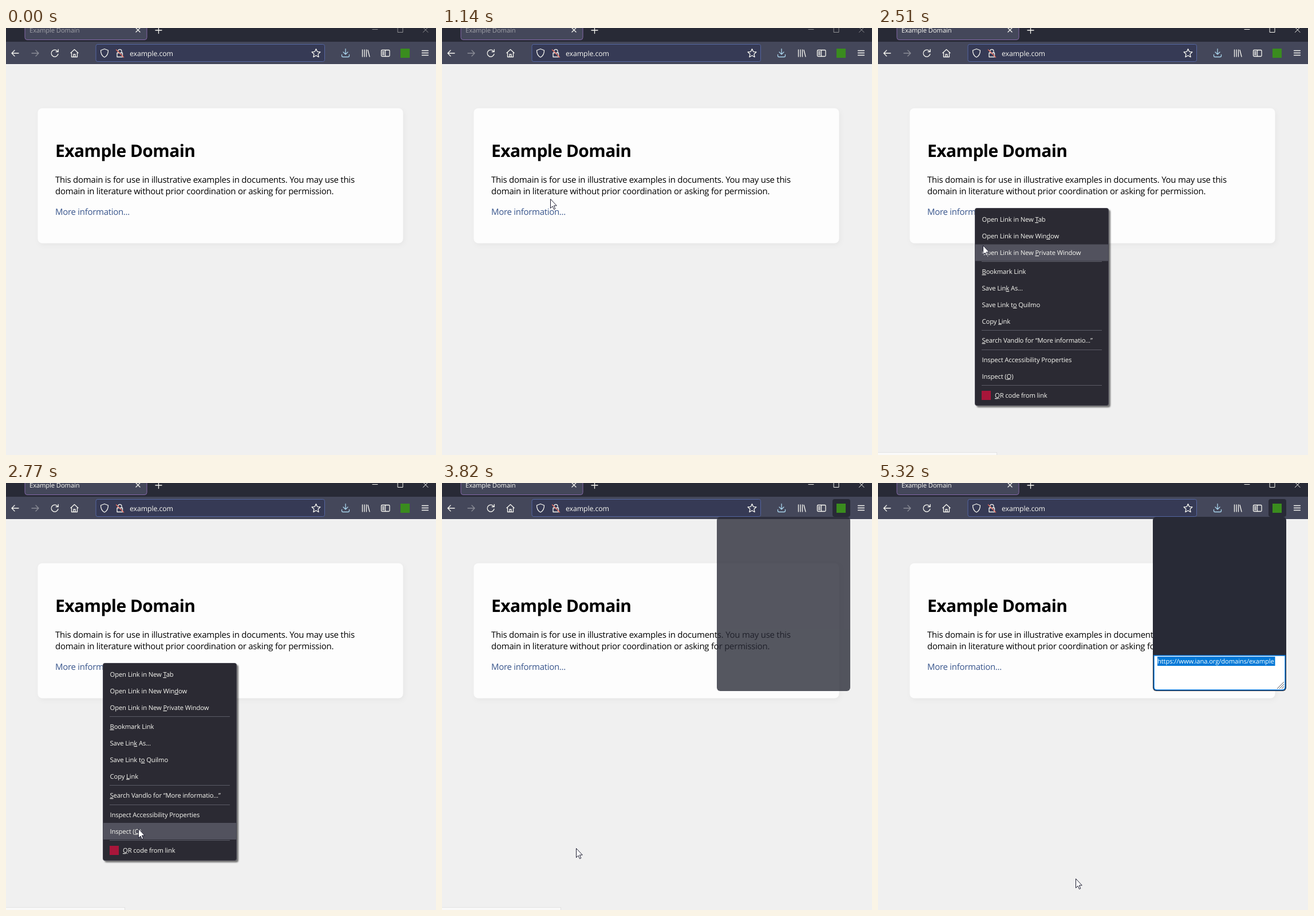
These frames come from a looping animation (751x745 px, 5.34 s). An HTML page:

```html
<!DOCTYPE html>
<html lang="en">
<head>
<meta charset="utf-8">
<title>Link menu demo</title>
<style>
  html, body { margin: 0; width: 100%; height: 100%; overflow: hidden; background: #f0f0f0; }
  svg { display: block; width: 100%; height: 100%; }
  text { font: 11.25px "Open Sans", "Noto Sans", sans-serif; letter-spacing: -.13px;
         fill: #f8f8f2; white-space: pre; text-rendering: geometricPrecision; }
  .page text { font-size: 15px; letter-spacing: -.25px; fill: #000; }
  .page .heading { font-size: 30px; font-weight: 700; letter-spacing: -.58px; }
  .page .link { fill: #38558c; letter-spacing: -.3px; }
  .address { font-size: 12.3px; letter-spacing: -.1px; }
  .key { text-decoration: underline; }
  .icons { fill: none; stroke: #f8f8f2; stroke-width: 1.3; stroke-linecap: round; stroke-linejoin: round; }
  .card { filter: drop-shadow(2px 3px 4px rgba(0, 0, 0, .04)); }
  .selected { fill: #fff; }
  #menu { filter: drop-shadow(3px 3px 1px rgba(0, 0, 0, .5)); }
  #pointer path { fill: #fff; stroke: #1c1c30; stroke-linejoin: round; }
</style>
</head>
<body>
<svg viewBox="0 0 751 745" preserveAspectRatio="none">
  <rect width="751" height="745" fill="#f0f0f0"/>

  <g class="page">
    <rect class="card" x="55.5" y="140" width="638" height="235.5" rx="8" fill="#fdfdfd"/>
    <text class="heading" x="86" y="225">Example Domain</text>
    <text x="86" y="270">This domain is for use in illustrative examples in documents. You may use this</text>
    <text x="86" y="290">domain in literature without prior coordination or asking for permission.</text>
    <text class="link" x="86" y="325.5">More information...</text>
  </g>
  <rect id="status" x="-1" y="740.5" width="208.5" height="8" fill="#f9f9f9" stroke="#e2e2e2"/>

  <rect width="751" height="24" fill="#282a36"/>
  <rect y="24" width="751" height="39" fill="#44475a"/>
  <rect y="63" width="751" height="1" fill="#fdfdfd"/>
  <rect x="33" y="-8" width="213" height="28.5" rx="4" fill="#44475a" stroke="#8468a8"/>
  <rect x="157" y="28.5" width="399.5" height="30" rx="3" fill="#363a55" stroke="#5567a2"/>
  <text class="address" x="216" y="48.5">example.com</text>
  <rect id="pressed" x="682" y="28" width="31" height="31" rx="4" fill="#282a36"/>
  <rect x="689" y="36" width="16" height="16" fill="#3a8c1e"/>

  <g id="chrome">
    <text x="41" y="8">Example Domain</text>
    <path class="icons" style="stroke-width:1" d="M640 2.5h9M684.5-1.5h8.5v9h-8.5zM728.5-1l8.500 8.500m0-8.500l-8.500 8.500"/>
  </g>
  <g class="icons">
    <path d="M227 0l7 7m0-7l-7 7M261 4h11M266.500-2v11.500"/>
    <path d="M22 44H10m5-5l-5 5 5 5"/>
    <path d="M45 44h12m-5-5l5 5-5 5" opacity=".4"/>
    <path d="M90.300 41a6 6 0 1 0 .700 4.500M91.300 37.500v4h-4"/>
    <path d="M113 43.500l6.500-6 6.500 6M114.500 43v7.500h10V43M118 50v-4h3v4"/>
    <path d="M172 36.500l6.500 2.500c0 5-1.500 9.500-6.500 12-5-2.500-6.500-7-6.500-12z"/>
    <path d="M194 43.500h9.500v7H194zM195.700 43v-2.500a3 3 0 0 1 6.300 0V43"/>
    <path d="M192.500 38l13 13" stroke="#f07060"/>
    <path d="M541.500 36.500l2.200 4.800 5.200.6-3.900 3.500 1.100 5.200-4.600-2.600-4.600 2.600 1.100-5.200-3.900-3.500 5.200-.6z"/>
    <path d="M593 36.500V46m-4-4l4 4 4-4M586.500 46.500v2q0 2 2 2h9q2 0 2-2v-2" stroke="#a9d4ec"/>
    <path d="M622.500 38v12M626 38v12M629.500 38v12M632 38.500l3 11.500"/>
    <path d="M657 38.500h11.500q1.500 0 1.500 1.500v8q0 1.500-1.500 1.500H657q-1.500 0-1.500-1.500v-8q0-1.500 1.500-1.500zM662.500 38.500v11M657.500 41.500h3m-3 2.500h3m-3 2.500h3"/>
    <path d="M726.500 39.500h11m-11 4h11m-11 4h11"/>
  </g>

  <g id="menu">
    <rect x="169.500" y="314.500" width="233" height="344" rx="3" fill="#2b2a33" stroke="#454450"/>
    <rect id="hover" x="170" width="232" height="29" fill="#52525e"/>
    <path d="M181 407.500h210M181 527.500h210M181 561.500h210M181 623.500h210" stroke="#5b5b66"/>
    <rect x="181" y="633" width="16" height="16" fill="#a8163a"/>
  </g>

  <g id="popup">
    <rect x="480" y="59" width="233" height="304" rx="6" fill="#282a36"/>
    <g id="field">
      <path d="M482 301h229v55q0 5-5 5H487q-5 0-5-5z" fill="#fff" stroke="#0a7be0" stroke-width="1.500"/>
      <rect x="488" y="303" width="205.500" height="16" fill="#0078d7"/>
      <text class="selected" x="488" y="315">https://www.iana.org/domains/example</text>
      <path d="M697 359l12-12m-8 12l8-8m-4 8l4-4" stroke="#55555c"/>
    </g>
  </g>

  <g id="pointer">
    <path id="arrow" d="M.5 .5V16.500L4 13l2.500 5.500 2.300-1L6.400 12H11.300z"/>
    <path id="hand" transform="translate(-6 -.5)" d="M4.500 2.200a1.500 1.500 0 0 1 3 0V7q0-1 1.300-1t1.400 1.200q.2-.9 1.400-.8t1.300 1.300q.3-.7 1.200-.5t1.100 1.300v5q0 2-1.300 3.600v3.400H5.500v-2.300Q4 16 1.400 12.700C.3 11.200 .3 10.300 1 9.800s2.200 0 3.500 1.600z"/>
  </g>
</svg>
<script>
const LOOP = 5340;
const ROW = 29;
const rows = [
  [334, 'Open Link in New _T_ab'],
  [363, 'Open Link in New Win_d_ow'],
  [392, 'Open Link in New _P_rivate Window'],
  [425, '_B_ookmark Link'],
  [454, 'Save Lin_k_ As...'],
  [483, 'Save Link t_o_ Quilmo'],
  [511.5, 'Copy _L_ink'],
  [545, '_S_earch Vandlo for “More informatio...”'],
  [579, 'Inspect Accessibility Properties'],
  [607.5, 'Inspect (_Q_)'],
  [641, '_Q_R code from link', 204]
];

// [time, x, y, slowdown]: a positive slowdown decelerates into the point
const path = [
  [80, 712, 750, 0],
  [620, 348, 394, .45],
  [1160, 185, 296, .35],
  [1560, 168, 313, .3],
  [2400, 168, 313, 0],
  [2530, 188, 400, -.8],
  [2770, 231, 603, .6],
  [2940, 234, 637, .5],
  [3020, 234, 630, 0],
  [3100, 234, 637, 0],
  [5200, 234, 637, 0],
  [5320, 345, 690, .2]
];

const $ = id => document.getElementById(id);
const clamp = v => Math.min(1, Math.max(0, v));
const ramp = (t, from, to) => clamp((t - from) / (to - from));
const during = (t, from, to) => t >= from && t < to;
const show = (id, opacity) => $(id).setAttribute('opacity', +opacity);

function svgNode(parent, tag, attrs, content = '') {
  const node = document.createElementNS('http://www.w3.org/2000/svg', tag);
  for (const name in attrs) node.setAttribute(name, attrs[name]);
  node.textContent = content;
  return parent.appendChild(node);
}

for (const [y, label, x = 181.5] of rows) {
  const text = svgNode($('menu'), 'text', { x, y: y + 4 });
  label.split('_').forEach((part, i) =>
    svgNode(text, 'tspan', i % 2 ? { class: 'key' } : {}, part));
}

function pointerAt(t) {
  const next = path.findIndex(point => point[0] > t);
  if (next === 0) return path[0].slice(1, 3);
  if (next < 0) return path.at(-1).slice(1, 3);
  const [t0, x0, y0] = path[next - 1];
  const [t1, x1, y1, slowdown] = path[next];
  const u = ramp(t, t0, t1);
  const k = u + slowdown * u * (1 - u);
  return [x0 + (x1 - x0) * k, y0 + (y1 - y0) * k];
}

function render(t) {
  const [x, y] = pointerAt(t);
  $('pointer').setAttribute('transform', `translate(${Math.round(x)} ${Math.round(y)})`);
  const overLink = during(t, 1400, 2440);
  show('hand', overLink);
  show('arrow', !overLink);

  const row = during(t, 2440, 3600) && rows.find(([center]) => Math.abs(y - center) <= ROW / 2);
  show('hover', !!row);
  if (row) $('hover').setAttribute('y', row[0] - ROW / 2);

  show('chrome', .5 + .5 * ramp(t, 1790, 1910));
  show('status', during(t, 1450, 5220));
  show('menu', ramp(t, 1790, 1910) * (1 - ramp(t, 3510, 3590)));
  show('pressed', t >= 3640);
  show('popup', ramp(t, 3680, 3860));
  show('field', ramp(t, 3880, 4020));
}

function tick() {
  render(performance.now() % LOOP);
  requestAnimationFrame(tick);
}
tick();
</script>
</body>
</html>
```
